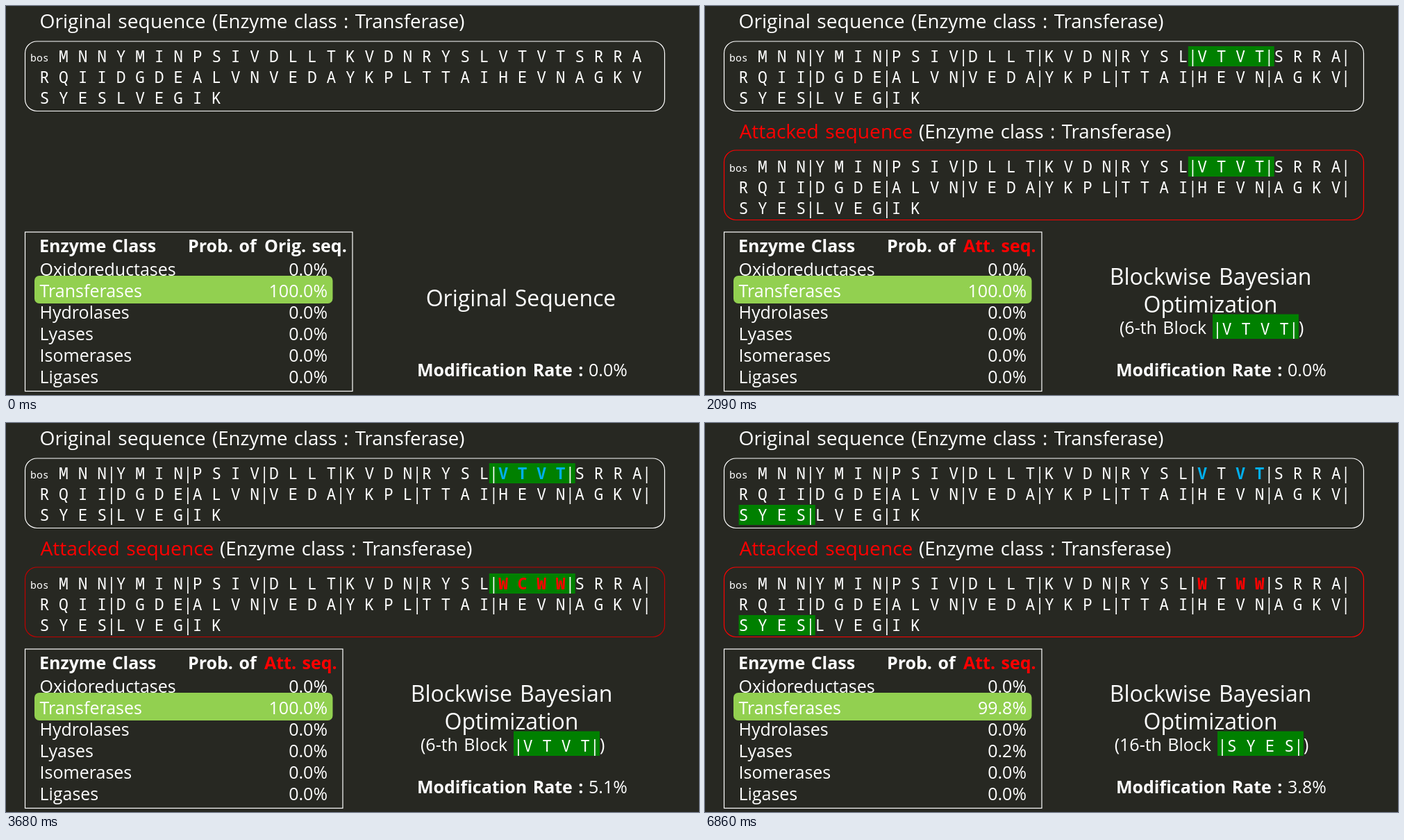
Animation of 998 by 561 pixels, one loop 8000 ms. Source, as an HTML page:

```html
<!DOCTYPE html>
<html lang="en">
<head>
<meta charset="utf-8">
<style>
html, body { margin: 0; width: 100%; height: 100%; overflow: hidden; background: #272822; }
svg { display: block; }
text { fill: #fff; white-space: pre; font: 25px "Open Sans", "Noto Sans", sans-serif; font-variant-ligatures: none; word-spacing: .08em; }
.bold { font-weight: 700; }
.mono { font-family: "Noto Sans Mono", "DejaVu Sans Mono", monospace; font-size: 22.95px; font-weight: 500; word-spacing: 0; }
.small { font-size: 14.8px; }
.title { font-size: 28.2px; }
.label { font-size: 27.6px; }
.big { font-size: 32px; text-anchor: middle; }
.right { text-anchor: end; }
</style>
</head>
<body>
<svg id="stage" width="998" height="561" viewBox="0 0 998 561"></svg>
<script>
const LINES = [
  ' MNNYMINPSIVDLLTKVDNRYSLVTVTSRRA',
  'RQIIDGDEALVNVEDAYKPLTTAIHEVNAGKV',
  'SYESLVEGIK'
];
const CLASSES = ['Oxidoreductases', 'Transferases', 'Hydrolases', 'Lyases', 'Isomerases', 'Ligases'];
const CELL = 13.77, LEFT = 48.6, SITE = 24;
const WHITE = '#fff', RED = '#f00', BLUE = '#00b0f0', GREEN = '#008000';

// swap: replacements for the four letters from SITE on, '.' keeps the letter
const SCENES = [
  { at: 0, title: 'Original Sequence', center: 741.5 },
  { at: 500, title: 'Calculate Block Importance', center: 728, bars: true },
  { at: 2090, block: 6 },
  { at: 3680, block: 6, swap: 'WCWW', rate: '5.1%', edge: '#c00000' },
  { at: 5270, block: 6, swap: 'W.WW', rate: '3.8%', drop: true },
  { at: 6860, block: 16, swap: 'W.WW', rate: '3.8%', drop: true }
];

const text = (x, y, s, cls = '', fill = WHITE) =>
  `<text x="${x}" y="${y}" class="${cls}" style="fill:${fill}">${s}</text>`;
const fillBox = (x, y, w, h, fill, r = 0) =>
  `<rect x="${x}" y="${y}" width="${w}" height="${h}" rx="${r}" fill="${fill}"/>`;
const frameBox = (x, y, w, h, color, r = 0) =>
  `<rect x="${x}" y="${y}" width="${w}" height="${h}" rx="${r}" fill="none" stroke="${color}" stroke-width="1.2"/>`;

function sequence({ block, swap = '....', bars = !!block }, dy, attacked) {
  let out = '';
  if (block === 6) out += fillBox(LEFT + 47 * CELL, 58 + dy, 9 * CELL, 29, GREEN);
  if (block === 16) out += fillBox(LEFT, 118 + dy, 8 * CELL, 29, GREEN);
  out += text(35, 80 + dy, 'bos', 'mono small');
  LINES.forEach((line, row) => {
    const cells = [...line].map((ch, i) => {
      const sub = row === 0 && swap[i - SITE] || '.';
      const letter = sub === '.' ? ch
        : `<tspan class="bold" fill="${attacked ? RED : BLUE}">${attacked ? sub : ch}</tspan>`;
      return letter + (bars && i % 4 === 3 ? '|' : ' ');
    });
    out += text(LEFT, 81 + 29.9 * row + dy, cells.join(''), 'mono');
  });
  return out;
}

function table({ block, drop }) {
  const probs = CLASSES.map(() => '0.0%');
  probs[1] = drop ? '99.8%' : '100.0%';
  if (drop) probs[3] = '0.2%';
  return frameBox(27.5, 326, block ? 457.5 : 471.5, 229.5, WHITE)
    + fillBox(41, 389, 429.5, 40, '#92d050', 7)
    + text(48, 355, 'Enzyme Class', 'bold')
    + text(262, 355, 'Prob. of', 'bold')
    + text(372, 355, block ? 'Att. seq.' : 'Orig. seq.', 'bold', block ? RED : WHITE)
    + CLASSES.map((name, i) => {
      const y = 388.5 + 31.15 * i;
      return text(48.5, y, name) + text(463, y, probs[i], 'right');
    }).join('');
}

function caption({ title, center, block, rate = '0.0%' }) {
  const out = text(592, 534, 'Modification Rate :', 'bold') + text(839, 534, rate);
  if (!block) return out + text(center, 433, title, 'big');
  const x = block === 6 ? 731 : 738;
  return out
    + text(728, 402, 'Blockwise Bayesian', 'big')
    + text(728, 442, 'Optimization', 'big')
    + text(x - 9, 473, `(${block}-th Block`, 'right')
    + fillBox(x, 444.5, 9 * CELL, 35.5, GREEN)
    + text(x, 474, block === 6 ? '|V T V T|' : '|S Y E S|', 'mono')
    + text(x + 9 * CELL, 473, ')');
}

function render(scene) {
  const label = '(Enzyme class : Transferase)';
  let out = text(48.5, 32, 'Original sequence', 'title') + text(297, 32, label, 'label')
    + frameBox(27.5, 51, 921, 100.5, WHITE, 17) + sequence(scene, 0, false);
  if (scene.block) {
    out += text(49.5, 190.5, 'Attacked sequence', 'title', RED) + text(308, 190.5, label, 'label')
      + frameBox(27.5, 208, 921, 100.5, scene.edge || RED, 17) + sequence(scene, 159, true);
  }
  return out + table(scene) + caption(scene);
}

const stage = document.getElementById('stage');
const start = performance.now();
let shown;
function tick() {
  const t = (performance.now() - start) % 8000;
  const scene = SCENES.findLast(s => s.at <= t);
  if (scene !== shown) stage.innerHTML = render(shown = scene);
  requestAnimationFrame(tick);
}
tick();
</script>
</body>
</html>
```
